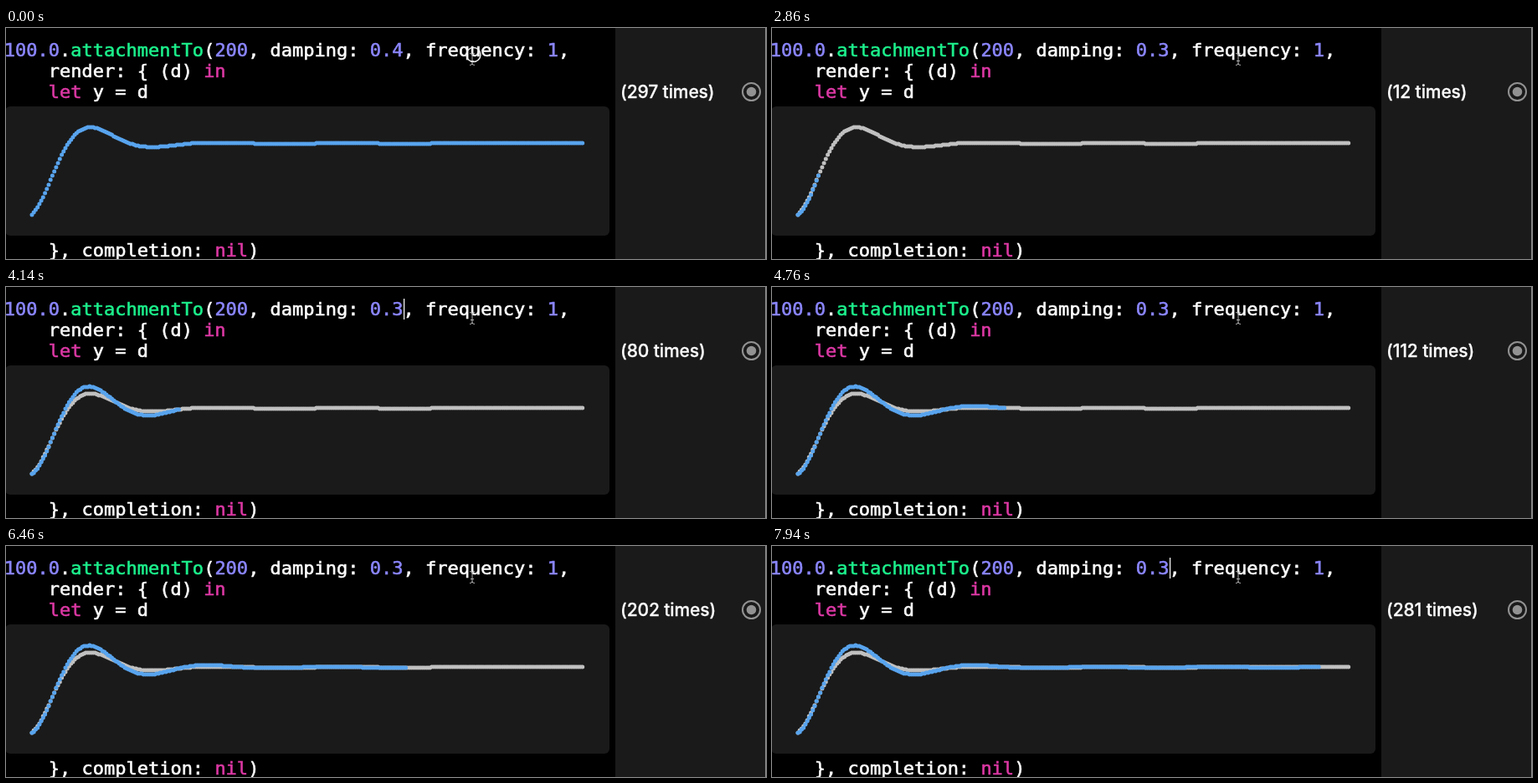
An HTML page that plays this animation: 908x277 px, repeating every 8000 ms.

```html
<!DOCTYPE html>
<html lang="en">
<head>
<meta charset="utf-8">
<title>Spring playground</title>
<style>
  html, body { margin: 0; width: 100%; height: 100%; overflow: hidden; background: #000; }
  svg { display: block; }
  text { white-space: pre; color: #fff; }
  text, tspan { fill: currentColor; stroke: currentColor; }
  .code { font: 22px "DejaVu Sans Mono", monospace; stroke-width: 0.6; }
  .num { color: #8b86ff; }
  .fn { color: #1cf08c; }
  .key { color: #dc38a4; }
  #count { font: 500 21px Inter, sans-serif; letter-spacing: -0.1px; stroke-width: 0.3; }
  #count.stale { font-weight: 300; letter-spacing: 0.15px; color: #8a8a8a; stroke: none; }
  .curve { fill: none; stroke-width: 5; stroke-linecap: round; }
</style>
</head>
<body>
<svg width="908" height="277" viewBox="0 0 908 277">
  <rect width="908" height="277" fill="#000"/>
  <rect x="728" width="179" height="277" fill="#1a1a1a"/>
  <rect x="907" width="1" height="277" fill="#888"/>
  <rect x="-1" y="94" width="722" height="155" rx="6" fill="#1a1a1a"/>

  <g class="code">
    <text x="-2.3" y="34"><tspan class="num">100.0</tspan>.<tspan id="fn" class="fn">attachmentTo</tspan>(<tspan class="num">200</tspan>, damping: <tspan id="damping" class="num">0.4</tspan>, frequency: <tspan class="num">1</tspan>,</text>
    <text x="50.7" y="59">render: { (d) <tspan class="key">in</tspan></text>
    <text x="50.7" y="84"><tspan class="key">let</tspan> y = d</text>
    <text x="50.7" y="274">}, completion: <tspan class="key">nil</tspan>)</text>
  </g>

  <path id="past" class="curve" stroke="#c0c0c0"/>
  <path id="live" class="curve" stroke="#58a4ee"/>

  <text id="count" x="734" y="84"></text>
  <g id="dial">
    <circle cx="890.5" cy="76.5" r="10.5" fill="none" stroke-width="2"/>
    <circle cx="890.5" cy="76.5" r="5.8" stroke="none"/>
  </g>

  <rect id="caret" y="14" width="1.2" height="25" fill="#fff"/>
  <path d="M554 30.5q3 0 3 2v10q0 2-3 2M560 30.5q-3 0-3 2M557 42.5q0 2 3 2M555 39.5h4" fill="none" stroke="#b0b0b0" stroke-width="1"/>
  <circle id="click" cx="558.5" cy="32" r="8.5" fill="none" stroke="#eee" stroke-width="1.5"/>
</svg>
<script>
const LOOP = 8000, SAMPLES = 297, EDIT = 830, RETYPE = 950, STALE = 1430, RUN = 2680;
const $ = id => document.getElementById(id);

// Runs of screen updates: first time, last time, number of updates
const runs = [
  [360, 600, 4], [830, 950, 2], [1430, 1490, 2], [2680, 3480, 13], [3580, 4320, 12],
  [4420, 5160, 12], [5260, 6020, 13], [6120, 6920, 13], [6980, 7780, 13], [7840, 7940, 2]
];
const ticks = [0, 60, 1970, 2500];
for (const [from, to, n] of runs)
  for (let i = 0; i < n; i++)
    ticks.push(from + Math.round((to - from) * i / (n - 1) / 20 - 0.1) * 20);
ticks.sort((a, b) => a - b);

const progress = [[2680, 4], [3480, 47], [4760, 112], [5440, 148], [6460, 202], [7940, 281]];

function countAt(t) {
  let i = 1;
  while (i < progress.length - 1 && t > progress[i][0]) i++;
  const [t0, n0] = progress[i - 1], [t1, n1] = progress[i];
  return Math.round(n0 + (n1 - n0) * (t - t0) / (t1 - t0));
}

// Step response of a damped 1 Hz spring at 60 Hz; lead is the head start in samples
function spring(zeta, lead) {
  const w = 2 * Math.PI, root = Math.sqrt(1 - zeta * zeta);
  return Array.from({ length: SAMPLES }, (_, k) => {
    if (!k) return 0;
    const t = (k + lead) / 60, a = w * root * t;
    return 1 - Math.exp(-zeta * w * t) * (Math.cos(a) + zeta / root * Math.sin(a));
  });
}
const stiff = spring(0.43, 1.8), loose = spring(0.333, 1.2);

// Dots sit on whole pixels, so the settling wave shows as one-pixel steps
function dots(values, peak) {
  const rest = Math.round(105 / peak);
  return values.map((v, k) =>
    `M${(31 + 2.222 * k).toFixed(1)} ${Math.ceil(224 - rest * v - 0.002)}h0`).join("");
}

// Caret position in characters, or -1 when hidden
function caretAt(t) {
  if (t < 360) return -1;
  if (t < 600) return t < 440 ? 42 : t < 520 ? 38 : 37;
  if (t >= EDIT && t < RETYPE) return 35;
  if (t < STALE) return 36;
  if (t < RUN) return t >= 1970 && t < 2500 ? 36 : -1;
  return Math.floor((t - 2870) / 600) % 2 === 0 && t >= 2870 ? 36 : -1;
}

function draw(t) {
  const running = t >= RUN, stale = t >= STALE && !running;
  const count = running ? countAt(t) : SAMPLES;
  const shown = running ? loose.slice(0, count) : [];
  const peak = Math.max(...stiff, ...shown);

  $("past").setAttribute("d", t >= STALE ? dots(stiff, peak) : "");
  $("live").setAttribute("d", t < STALE ? dots(stiff, peak) : dots(shown, peak));

  $("count").textContent = `(${count} times)`;
  $("count").setAttribute("class", stale ? "stale" : "");
  const tone = stale ? "#a0a0a0" : "#929292";
  $("dial").setAttribute("fill", tone);
  $("dial").setAttribute("stroke", tone);

  $("damping").textContent = t < EDIT ? "0.4" : t < RETYPE ? "0." : "0.3";
  $("fn").setAttribute("class", t >= EDIT && t < STALE ? "" : "fn");

  const caret = caretAt(t);
  $("caret").setAttribute("visibility", caret < 0 ? "hidden" : "visible");
  $("caret").setAttribute("x", Math.round(-2.3 + 13.245 * caret));
  $("click").setAttribute("visibility", t < 60 ? "visible" : "hidden");
}

const start = performance.now();
let last = -1;
function frame() {
  const now = (performance.now() - start) % LOOP;
  const t = ticks.filter(x => x <= now).pop();
  if (t !== last) draw(last = t);
  requestAnimationFrame(frame);
}
frame();
</script>
</body>
</html>
```
